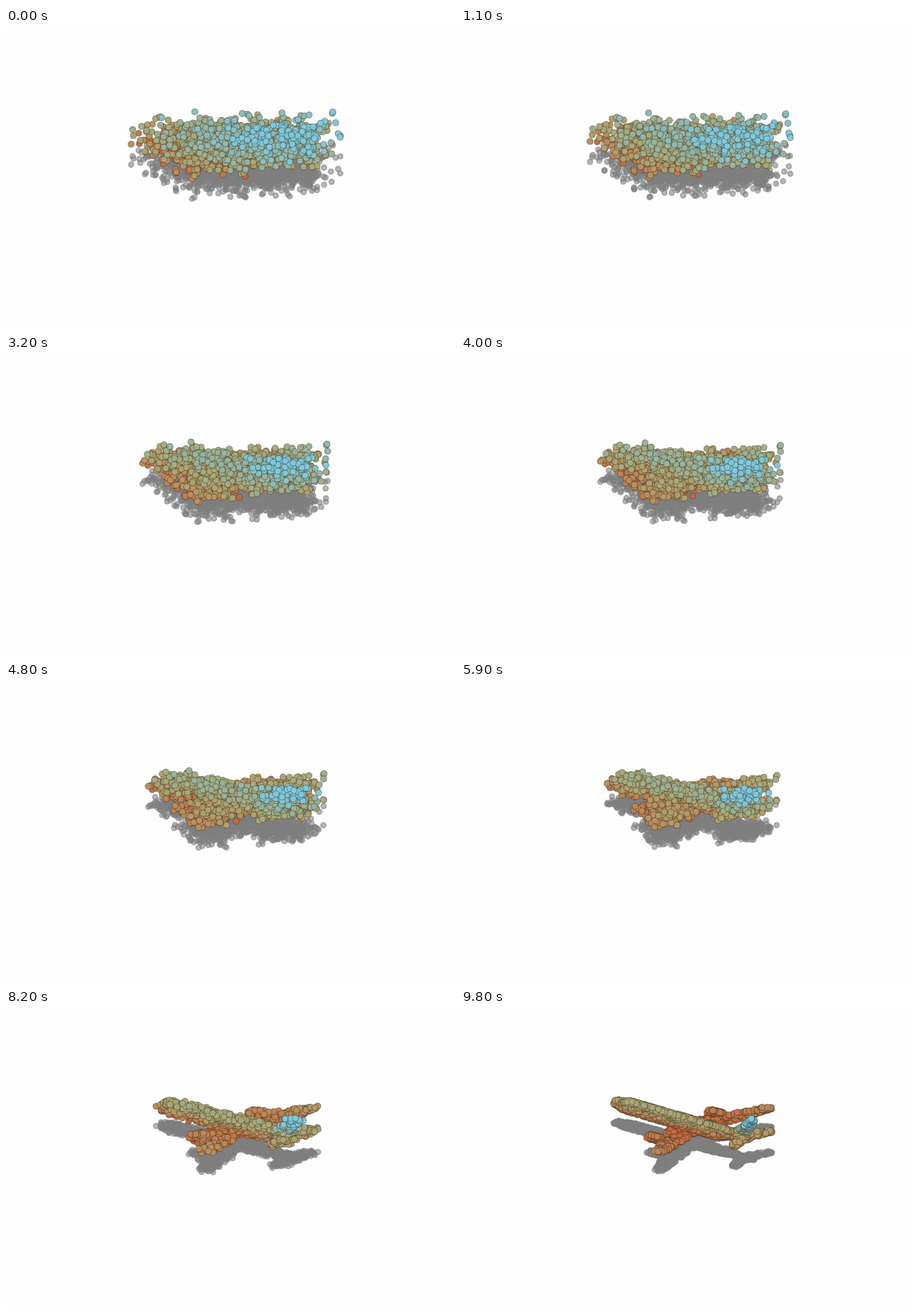
An HTML page with a canvas for the animation above (9900 ms loop, 600 by 400 pixels).

```html
<!DOCTYPE html>
<html lang="en">
<head>
<meta charset="utf-8">
<title>Point cloud</title>
<style>
html, body { margin: 0; width: 100%; height: 100%; overflow: hidden; background: #fefefe; }
canvas { display: block; width: 600px; height: 400px; }
</style>
</head>
<body>
<canvas id="stage" width="600" height="400"></canvas>
<script>
const ctx = document.getElementById('stage').getContext('2d');
const LOOP = 9900, STEP = 100, FLOOR = 18;
const TAU = Math.PI * 2;

const mix = (a, b, k) => a + (b - a) * k;
const clamp = (v, a, b) => Math.max(a, Math.min(b, v));

let seed = 20417;
function rnd() {
  seed = (seed + 0x6D2B79F5) | 0;
  let a = Math.imul(seed ^ (seed >>> 15), 1 | seed);
  a = (a + Math.imul(a ^ (a >>> 7), 61 | a)) ^ a;
  return ((a ^ (a >>> 14)) >>> 0) / 4294967296;
}
function gauss() {
  return Math.sqrt(-2 * Math.log(1 - rnd() * 0.97)) * Math.cos(TAU * rnd());
}
const side = () => rnd() < 0.5 ? -1 : 1;

// Each dot: ground position (x, y) and height h, at start and end of the loop.
const dots = [];

// u runs nose to tail, v across the wings, h is height above ground.
function add(u, v, h) {
  const x = 207 + 186 * u - 75 * v;
  const y = 151 + 51 * u + 30 * v;
  const x0 = 303 + 0.75 * (x - 303) + 34 * gauss();
  const y0 = 188 + 0.5 * (y - 183) + 11.5 * gauss();
  const lift = 32 + 0.6 * (h - 25) + 0.05 * (x0 - 300) + 4.5 * gauss();
  const h0 = FLOOR + Math.abs(lift - FLOOR);
  dots.push({ x0, y0, h0, x, y, h });
}

function fuselage() {
  const u = rnd() * 0.95, q = rnd() * TAU;
  const nose = Math.sqrt(clamp(u / 0.09, 0.3, 1));
  const tail = clamp((0.95 - u) / 0.2, 0.25, 1);
  const r = Math.min(nose, tail);
  const mid = mix(26, 23.5, u) + 4 * (1 - tail);
  add(u, Math.cos(q) * 0.095 * r, mid + Math.sin(q) * 6.5 * r);
}
function wing() {
  const w = 0.08 + 0.92 * Math.pow(rnd(), 1.15);
  const front = mix(0.4, 0.68, w), back = mix(0.6, 0.73, w);
  add(mix(front, back, rnd()), w * side(), mix(18.5, 24.5, w * w) + rnd() * 1.5);
}
function engine() {
  const q = rnd() * TAU;
  add(mix(0.45, 0.54, rnd()), side() * (0.55 + Math.cos(q) * 0.045), 20.5 + Math.sin(q) * 2.5);
}
function tailplane() {
  const w = rnd();
  const front = mix(0.88, 0.96, w), back = mix(0.97, 1, w);
  add(mix(front, back, rnd()), side() * 0.33 * w, 26.5 + rnd() * 2.5);
}
function fin() {
  const k = rnd();
  const front = mix(0.86, 0.97, k), back = mix(0.95, 1, k);
  add(mix(front, back, rnd()), (rnd() - 0.5) * 0.03, mix(32, 54, k));
}
function repeat(n, make) {
  while (n--) make();
}
repeat(900, fuselage);
repeat(680, wing);
repeat(200, engine);
repeat(160, tailplane);
repeat(90, fin);

// Low to high, one stop every 7 px of height.
const RAMP = [[201, 92, 56], [190, 134, 84], [170, 168, 118], [146, 182, 170], [126, 200, 220]];
function tint(h) {
  const s = clamp((h - FLOOR) / 7, 0, RAMP.length - 1.001);
  const i = Math.floor(s);
  const c = RAMP[i].map((v, n) => Math.round(mix(v, RAMP[i + 1][n], s - i)));
  return `rgb(${c})`;
}

function disc(x, y, r) {
  ctx.beginPath();
  ctx.arc(x, y, r, 0, TAU);
  ctx.fill();
  ctx.stroke();
}

function draw(k) {
  ctx.fillStyle = '#fefefe';
  ctx.fillRect(0, 0, 600, 400);

  const now = dots.map(d => ({
    x: mix(d.x0, d.x, k),
    y: mix(d.y0, d.y, k),
    h: mix(d.h0, d.h, k)
  }));
  now.sort((p, q) => p.h - q.h);

  ctx.fillStyle = ctx.strokeStyle = 'rgba(128,128,128,0.58)';
  ctx.lineWidth = 1.4;
  for (const p of now) disc(p.x, p.y, 3.5);

  ctx.strokeStyle = 'rgba(50,45,35,0.6)';
  ctx.lineWidth = 0.7;
  for (const p of now) {
    ctx.fillStyle = tint(p.h);
    disc(p.x, p.y - p.h, 4.1);
  }
}

const start = performance.now();
let shown = -1;
function tick() {
  const t = (performance.now() - start) % LOOP;
  const step = Math.floor(t / STEP);
  if (step !== shown) {
    shown = step;
    draw(step * STEP / (LOOP - STEP));
  }
  requestAnimationFrame(tick);
}
tick();
</script>
</body>
</html>
```
